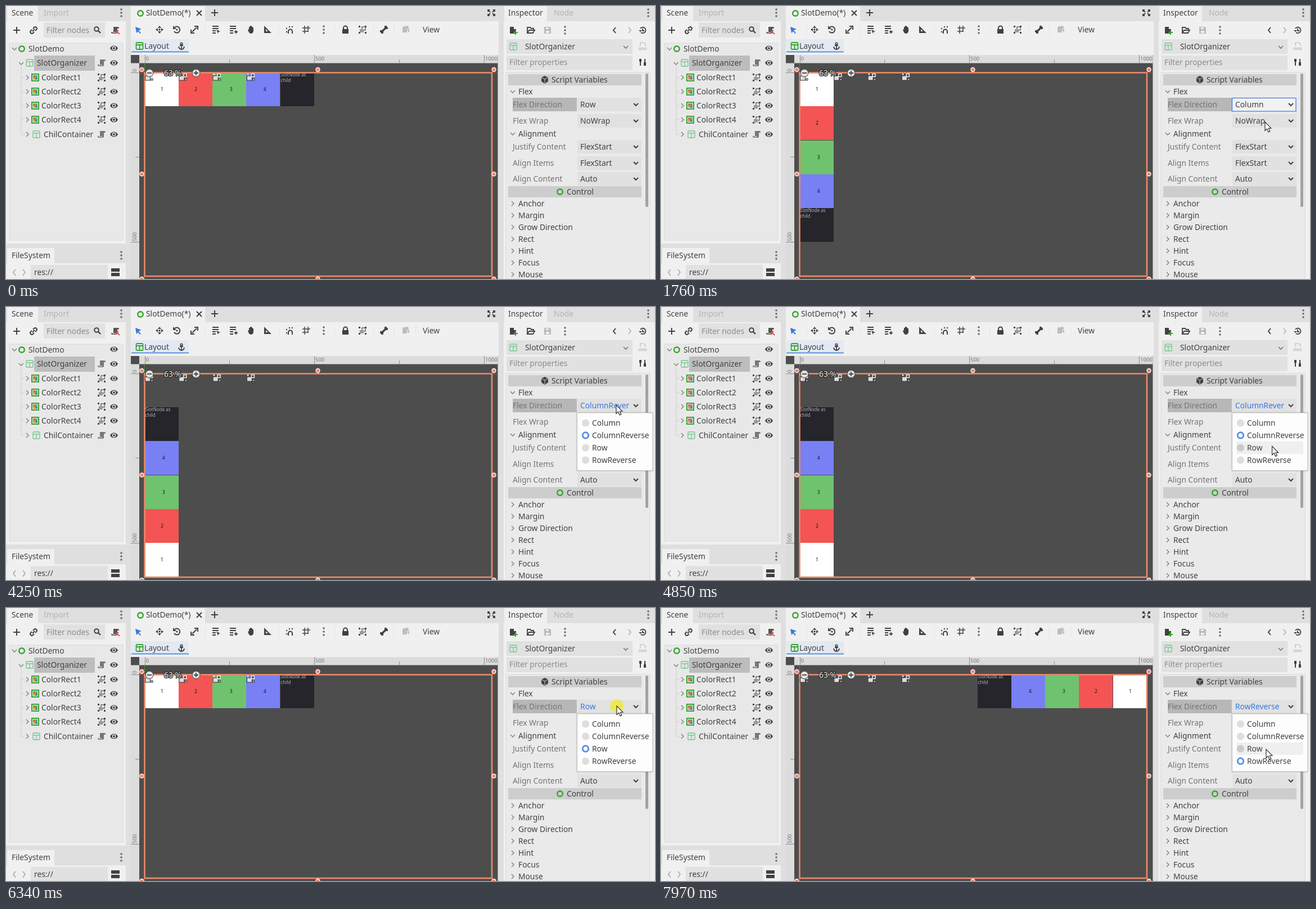
Recreate the animation shown at these times as an HTML page. Size 1154 px wide and 485 px high, loop 8 s.

```html
<!DOCTYPE html>
<html lang="en">
<head>
<meta charset="utf-8">
<title>Container layout demo</title>
<style>
html, body { margin: 0; width: 100%; height: 100%; overflow: hidden; background: #dfdfdf; }
svg { display: block; }
text { font-family: "Noto Sans", sans-serif; font-size: 13.8px; fill: #414141; white-space: pre; }
</style>
</head>
<body>
<svg id="stage" width="1154" height="485" viewBox="0 0 1154 485"></svg>
<script>
const INK = '#414141', DIM = '#747474', FADE = '#b4b4b4', BLUE = '#3b78dc';
const PANEL = '#f0f0f0', FIELD = '#e1e1e1', GREEN = '#35a32d', MINT = '#8fcfa3';
const DUR = 8000;
const MODES = ['Column', 'ColumnReverse', 'Row', 'RowReverse'];

// Drawing helpers; text is placed by its vertical centre.
const rect = (x, y, w, h, fill, extra = '') =>
  `<rect x="${x}" y="${y}" width="${w}" height="${h}" fill="${fill}" ${extra}/>`;
const circle = (x, y, r, fill, extra = '') =>
  `<circle cx="${x}" cy="${y}" r="${r}" fill="${fill}" ${extra}/>`;
const ring = (x, y, r, color, w) => circle(x, y, r, 'none', `stroke="${color}" stroke-width="${w}"`);
const line = (d, color = INK, w = 2) =>
  `<path d="${d}" fill="none" stroke="${color}" stroke-width="${w}"/>`;
const shape = (d, color = INK, extra = '') => `<path d="${d}" fill="${color}" ${extra}/>`;
const text = (x, y, s, color = INK, extra = '') =>
  `<text x="${x}" y="${y + 5}" style="fill:${color}" ${extra}>${s}</text>`;
const at = (x, y, s) => `<g transform="translate(${x} ${y})">${s}</g>`;

const dots = (x, y) => [-6, 0, 6].map(d => circle(x, y + d, 1.8, '#6a6a6a')).join('');
const plus = (x, y, r = 6) => line(`M${x - r} ${y}h${2 * r}M${x} ${y - r}v${2 * r}`);
const down = (x, y, color = INK, r = 4, w = 2) => line(`M${x - r} ${y - r / 2}l${r} ${r}l${r} ${-r}`, color, w);
const right = (x, y, color = '#8a8a8a') => line(`M${x - 2} ${y - 4}l4 4l-4 4`, color, 1.6);

const eye = (x, y) => at(x, y,
  shape('M-7 0C-4 -6 4 -6 7 0C4 6 -4 6 -7 0Z') + circle(0, 0, 3.4, '#e6e6e6') + circle(0, 0, 1.9, INK));
const group = (x, y, c = '#4a4a4a') => at(x, y,
  [[-7, -7], [4, -7], [-7, 4], [4, 4]].map(p => rect(p[0], p[1], 3, 3, c)).join('') +
  rect(-1, -5, 6, 6, '#eee', `stroke="${c}" stroke-width="1.2"`) + rect(-5, -1, 7, 6, '#9a9a9a'));
const script = (x, y, c = '#777') => at(x, y,
  shape('M-3 -6H5Q7 -6 7 -3H4V4Q4 6 1 6H-5Q-7 6 -7 3H-3Z', c) + line('M-5 4H1', '#eee', 1));
const pane = (x, y, c) => at(x, y,
  rect(-6, -6, 12, 12, 'none', `rx="1.5" stroke="${c}" stroke-width="1.8"`) + line('M-6 -2H6M0 -2V6', c, 1.8));
const swatch = (x, y) => at(x, y,
  rect(-6, -6, 12, 12, '#f4f4f4', `stroke="${GREEN}" stroke-width="2"`) +
  rect(-4, -4, 4, 4, '#e8605a') + rect(0, -4, 4, 4, '#58b862') + rect(-4, 0, 4, 4, '#d9a04a') + rect(0, 0, 4, 4, '#5d78df'));
const magnifier = (x, y) => ring(x - 1, y - 1, 3.8, INK, 2) + line(`M${x + 2} ${y + 2}l4 4`, INK, 2.4);

function leftDock() {
  let s = rect(0, 27, 213, 395, PANEL) + rect(2, 0, 55, 28, PANEL) +
    text(10, 12, 'Scene') + text(67, 12, 'Import', FADE) + dots(205, 12) +
    plus(19, 43) +
    at(49, 43, line('M-1 -3l2 -2a2.8 2.8 0 0 1 4 4l-2 2M1 3l-2 2a2.8 2.8 0 0 1 -4 -4l2 -2M-2 2l4 -4')) +
    rect(67, 29, 109, 27, FIELD) + text(72, 43, 'Filter nodes', '#8c8c8c') + magnifier(162, 42) +
    script(194, 43, '#555') + line('M194 49l6 -6M196 44l6 6', '#d95550', 2) +
    rect(6, 66, 202, 350, '#e8e8e8', 'stroke="#dadada"') +
    rect(50, 88, 108, 27, '#bdbdbd') +
    line('M27 107V228M27 127H33M27 152H33M27 177H33M27 202H33M27 228H33', '#d0d0d0', 1) +
    down(15, 76, '#8a8a8a', 4, 1.6) + ring(28, 76, 4.8, GREEN, 2.4) + text(40, 76, 'SlotDemo') + eye(192, 75) +
    down(27, 102, '#8a8a8a', 4, 1.6) + pane(42, 101, MINT) + text(55, 101, 'SlotOrganizer') +
    script(170, 101) + eye(192, 101);
  for (let i = 0; i < 4; i++) {
    const y = 127 + 25 * i;
    s += right(38, y) + swatch(52, y) + text(63, y, 'ColorRect' + (i + 1)) + group(170, y) + eye(192, y);
  }
  s += right(38, 228) + pane(54, 228, MINT) + text(67, 228, 'ChilContainer') + script(170, 228) + eye(192, 228);
  return s + rect(0, 457, 213, 28, PANEL) + rect(2, 430, 84, 28, PANEL) +
    text(10, 443, 'FileSystem') + dots(205, 443) +
    line('M17 468l-4 5l4 6M30 468l4 5l-4 6', '#aaa', 1.6) +
    rect(44, 460, 137, 27, FIELD) + text(50, 473, 'res://') +
    rect(187, 466, 15, 6, INK) + rect(187, 474, 15, 6, INK);
}

function toolbar() {
  return rect(222, 27, 654, 60, PANEL) + rect(222, 0, 132, 28, PANEL) +
    ring(239, 13, 4.8, GREEN, 2.4) + text(249, 12, 'SlotDemo(*)') +
    line('M339 8l9 9M348 8l-9 9') + plus(371, 12) +
    at(863, 12, line('M-6 -2V-5H-3M3 -5H6V-2M6 2V5H3M-3 5H-6V2M-6 -5l4 4M6 -5l-4 4M6 5l-4 -4M-6 5l4 -4', INK, 1.8)) +
    shape('M230 37L241 41L236 43L240 48L238 49L235 45L232 48Z', BLUE) +
    at(273, 42, shape('M0 -7L3 -3H-3ZM0 7L3 3H-3ZM-7 0L-3 -3V3ZM7 0L3 -3V3Z') + circle(0, 0, 1.8, INK)) +
    at(304, 42, line('M-4 -4A5.5 5.5 0 1 1 -5 3') + shape('M-7 -7V-1H-1Z') + circle(0, 0, 1.6, INK)) +
    at(335, 42, line('M-4 4L4 -4M-6 0V6H0M0 -6H6V0')) +
    at(373, 42, line('M-6 -6H5M-6 -2H5M-6 2H0M-6 6H0', INK, 1.8) + shape('M1 0L8 3L5 4L4 7Z')) +
    at(404, 42, line('M-6 -6H5M-6 -2H5M-6 2H0M-6 6H0', INK, 1.8) + line('M2 4H8M5 1V7', INK, 1.8)) +
    at(435, 42, shape('M-5 0L-3 -1V-5H-1V-1V-7H1V-1V-6H3V0V-4H5V3Q4 7 0 7Q-3 7 -5 0Z')) +
    at(465, 42, shape('M-6 -7V6H7ZM-3 -1V3H1Z', INK, 'fill-rule="evenodd"')) +
    at(504, 42, line('M-2 7V3A3.5 3.5 0 0 1 5 3V7', INK, 2) +
      circle(-5, -2, 1.2, INK) + circle(-5, 4, 1.2, INK) + circle(0, -5, 1.2, INK) + circle(5, -5, 1.2, INK)) +
    at(534, 42, line('M-7 -3H7M-7 3H4M-3 -7V7M3 -7V4', INK, 1.5)) +
    dots(565, 42) +
    rect(598, 41, 11, 8, INK) + line('M600 42V39a3.5 3.5 0 0 1 7 0V42') +
    group(634, 42) +
    at(672, 42, line('M-4 4L4 -4', INK, 3.4) + [[-5, 3], [-3, 5], [3, -5], [5, -3]].map(p => circle(p[0], p[1], 2.2, INK)).join('')) +
    at(710, 42, rect(-5, -2, 8, 7, '#bdbdbd') + circle(-2, -3, 3, '#bdbdbd') + circle(3, -4, 3, '#bdbdbd') + shape('M3 1L7 -2V5Z', '#bdbdbd')) +
    text(741, 42, 'View') +
    line('M585 33V53M654 33V53M690 33V53M729 33V53M260 33V53M354 33V53M486 33V53', '#e6e6e6', 1) +
    rect(223, 59, 102, 23, '#e3e9f2') + rect(223, 80.5, 102, 2, '#5a91e6') +
    pane(237.5, 71, GREEN) + text(246, 71, 'Layout') +
    at(312, 71, ring(0, -4, 1.8, INK, 1.6) + line('M0 -2V6M-5 1Q-4 6 0 6Q4 6 5 1M-3 -1H3', INK, 1.8));
}

function rulers() {
  const label = (x, y, s, extra = '') =>
    `<text x="${x}" y="${y}" style="font-size:9.5px;fill:#777" ${extra}>${s}</text>`;
  const side = (y, s) => label(0, 0, s, `transform="translate(232 ${y}) rotate(-90)"`);
  return rect(222, 87, 652.5, 398, '#4d4d4d') + rect(237, 87, 637.5, 14.5, '#dcdcdc') + rect(222, 101.5, 15, 384, '#dcdcdc') +
    line('M247.5 87V101M548.5 87V101M850.5 87V101M397.5 95V101M699.5 95V101' +
      'M222 118.5H237M222 419.5H237M230 268.5H237', '#8c8c8c', 1) +
    label(248.5, 97, '0') + label(550, 97, '500') + label(852, 97, '1000') + side(117, '0') + side(418, '500') +
    line('M237 118.5H874', '#a34b50', 1) + line('M246.5 101V485', '#4f8f3b', 1);
}

const CATEGORIES = ['Anchor', 'Margin', 'Grow Direction', 'Rect', 'Hint', 'Focus', 'Mouse'];
function option(y, label, value) {
  return text(901, y, label, DIM) + rect(1016, y - 12, 114, 24, FIELD) +
    (value ? text(1021, y, value) : '') + down(1120, y);
}
function inspector() {
  const header = y => rect(893, y, 237, 20, '#cdcdcd');
  return rect(885, 27, 269, 458, PANEL) + rect(886, 0, 76, 28, PANEL) +
    text(893, 12, 'Inspector') + text(974, 12, 'Node', FADE) + dots(1142, 12) +
    at(902, 43, shape('M-6 -6H1V-2H5V6H-6Z') + plus(4, 4, 4).replace(INK, GREEN)) +
    at(933, 43, line('M-6 5V-5H-1L1 -3H5V-1M-6 5L-3 0H7L4 5Z', INK, 1.8)) +
    at(963, 43, shape('M-6 -6H4L6 -4V6H-6ZM-3 1V5H3V1ZM-3 -5V-2H2V-5Z', '#bababa', 'fill-rule="evenodd"')) +
    dots(994, 43) + line('M1084 38l-4 5l4 5') + line('M1107 38l4 5l-4 5', '#bbb') +
    at(1132, 43, line('M-4 -3A5.2 5.2 0 1 1 -3 4M0 -3V1H3', INK, 1.8) + shape('M-7 0H-1L-4 3Z')) +
    rect(890, 59, 224, 26, FIELD) + pane(902, 72, MINT) + text(923, 72, 'SlotOrganizer') + down(1102, 73, '#777', 4, 1.6) +
    at(1132, 72, line('M-4 -1V-7H2L5 -4V-1', '#c9c9c9', 1.6) + [-5, 0, 5].map(x => ring(x, 4, 1.8, '#c9c9c9', 1.4)).join('')) +
    rect(890, 88, 224, 26, FIELD) + text(895, 100, 'Filter properties', '#8c8c8c') +
    at(1132, 100, line('M-4 -6V6M4 -6V6', INK, 2) + rect(-6, -6, 4, 5, INK) + rect(2, 0, 4, 6, INK)) +
    rect(889, 118, 256, 368, '#eaeaea', 'stroke="#dadada"') + rect(1137, 120, 5, 237, '#a3a3a3', 'rx="2"') +
    header(121) + shape('M958 124L964 127V134L958 138L952 134V127Z') + line('M952 127L958 130L964 127M958 130V137', '#cdcdcd', 1) +
    text(970, 131, 'Script Variables') +
    down(901, 152, '#8a8a8a', 4, 1.6) + text(911, 152, 'Flex') +
    rect(901, 163, 114, 24, '#b7b7b7') + option(175, 'Flex Direction') + option(204, 'Flex Wrap', 'NoWrap') +
    down(901, 227, '#8a8a8a', 4, 1.6) + text(911, 227, 'Alignment') +
    option(250, 'Justify Content', 'FlexStart') + option(279, 'Align Items', 'FlexStart') + option(307, 'Align Content', 'Auto') +
    header(320) + ring(985, 330, 4.8, GREEN, 2.4) + text(997, 330, 'Control') +
    CATEGORIES.map((s, i) => right(901, 351 + 21 * i) + text(911, 351 + 21 * i, s)).join('');
}

// Canvas contents
const SIZE = 60.3, COLORS = ['#fff', '#f45454', '#6fc36e', '#7880f4', '#25252b'];
function place(mode, i) {
  if (mode === 'Row') return [246.5 + SIZE * i, 118];
  if (mode === 'Column') return [246.5, 118 + SIZE * i];
  if (mode === 'RowReverse') return [864 - SIZE * (i + 1), 118];
  return [246.5, 479.5 - SIZE * (i + 1)];
}
function items(mode) {
  const tiny = (x, y, s, color) => `<text x="${x}" y="${y}" style="font-size:8px;fill:${color}">${s}</text>`;
  return COLORS.map((c, i) => {
    const [x, y] = place(mode, i).map(Math.round);
    const label = i < 4 ? tiny(28.3 + (i > 1 ? 2.6 : 0), 32.5, i + 1, '#111')
      : tiny(0.5, 6.5, 'SlotNode as', '#b5b5b5') + tiny(0.5, 16.5, 'child', '#b5b5b5');
    return at(x, y, rect(0, 0, 60, 60, c) + label);
  }).join('');
}

function overlay() {
  const edge = 'stroke="#333" stroke-width="1"';
  let s = rect(246.5, 118.5, 617.5, 361.5, 'none', 'stroke="#e98a68" stroke-width="2.6"');
  for (let i = 0; i < 4; i++) s += at(247 + 60.3 * i, 119,
    rect(0.5, 5, 9, 8, '#dcdcdc', edge) + rect(8.5, 1.5, 5, 5, '#444', 'stroke="#eee" stroke-width="1.5"') +
    rect(11, 10, 3, 3, '#eee', edge) + rect(1, 1, 2.5, 2.5, '#eee'));
  for (const x of [241.5, 554.5, 867.5]) for (const y of [113, 298.5, 485])
    if (x !== 554.5 || y !== 298.5) s += circle(x, y, 3.5, '#f5806c', 'stroke="#fff" stroke-width="1.3"');
  const button = (x, d) => circle(x, 119, 6.8, '#e2e2e2', 'stroke="#444" stroke-width="1"') + line(d, '#444', 1.8);
  return s + button(255, 'M251 119h8') + button(338, 'M334 119h8M338 115v8') +
    text(281, 119, '63 %', '#fff', 'stroke="#222" stroke-width="2.5" paint-order="stroke" stroke-linejoin="round"');
}

// Timeline: pointer stops [ms, x, y], mode changes and time spans.
const PATH = [
  [310, 960, 490], [760, 1085, 177], [1070, 1085, 177], [1420, 1074, 206], [1760, 1074, 206],
  [1970, 1084, 174], [2450, 1084, 174], [2860, 1081, 231], [3450, 1081, 231], [3920, 1085, 174],
  [4510, 1085, 174], [4990, 1087, 266], [5190, 1087, 256], [5660, 1087, 256], [6130, 1086, 174],
  [6400, 1086, 174], [6690, 1088, 271], [6900, 1088, 271], [7160, 1090, 207], [7300, 1086, 174],
  [7560, 1086, 174], [7970, 1076, 251]
];
const CHANGES = [[0, 'Row'], [1760, 'Column'], [3450, 'ColumnReverse'], [5660, 'Row'], [6890, 'RowReverse']];
const OPEN = [[800, 1760], [2250, 3450], [4250, 5660], [6200, 6890], [7360, DUR]];
const PRESS = [[870, 1000], [1690, 1760], [2320, 2450], [3320, 3450], [4380, 4510], [5390, 5660], [6270, 6400], [6750, 6890], [7430, 7560]];

const within = (spans, t) => spans.some(([a, b]) => t >= a && t < b);
function pointer(t) {
  const i = PATH.findIndex(p => p[0] > t);
  if (i < 0) return PATH[PATH.length - 1].slice(1);
  const [a, x, y] = PATH[i - 1], [b, u, v] = PATH[i];
  const p = (t - a) / (b - a), e = p * p * (3 - 2 * p);
  return [x + (u - x) * e, y + (v - y) * e];
}

function popup(mode, hover) {
  return rect(1013.5, 186, 138, 107, '#000', 'opacity=".07" rx="3"') +
    rect(1015.5, 188, 134.5, 102.5, '#fdfdfd', 'stroke="#bcbcbc"') +
    MODES.map((m, i) => {
      const y = 206 + 22 * i;
      return (i === hover ? rect(1023, y - 11, 119, 22, '#efefef') : '') +
        (m === mode ? circle(1030.5, y, 5.2, '#fff', 'stroke="#5d90e6" stroke-width="3"')
          : circle(1030.5, y, 6.6, i === hover ? '#cbcbcb' : '#dedede')) +
        text(1042, y, m);
    }).join('');
}

const ARROW = shape('M0 0V15.5L3.6 12.2L6.2 18L8.8 16.8L6.3 11.2H11Z', '#fff', 'stroke="#222" stroke-width="1.1"');
const stage = document.getElementById('stage');
stage.innerHTML = `<defs><clipPath id="value"><rect x="1016" y="160" width="92" height="30"/></clipPath></defs>` +
  rect(0, 0, 1154, 485, '#dfdfdf') + leftDock() + toolbar() + rulers() +
  `<g id="items"></g>${overlay()}${inspector()}<g id="live"></g>`;
const itemLayer = document.getElementById('items'), live = document.getElementById('live');
let shown = '';

function draw(t) {
  const mode = CHANGES.filter(c => c[0] <= t).pop()[1];
  if (mode !== shown) itemLayer.innerHTML = items(shown = mode);
  const open = within(OPEN, t);
  let s = '';
  if (!open && t >= CHANGES[1][0])
    s += rect(1015.5, 163.5, 113.5, 23.5, '#f2f2f2', `stroke="${BLUE}" stroke-width="1.2"`) + down(1120, 175);
  s += text(1021, 175, mode, open ? BLUE : INK, 'clip-path="url(#value)"');
  if (t >= PATH[0][0]) {
    const [x, y] = pointer(t);
    if (open) s += popup(mode, y >= 195 ? Math.floor((y - 195) / 22) : -1);
    if (within(PRESS, t)) s += circle(x, y, 11.8, '#f0ea1c', 'opacity=".72"');
    s += at(x, y, ARROW);
  }
  live.innerHTML = s;
}

const start = performance.now();
function tick() {
  draw((performance.now() - start) % DUR);
  requestAnimationFrame(tick);
}
tick();
</script>
</body>
</html>
```
